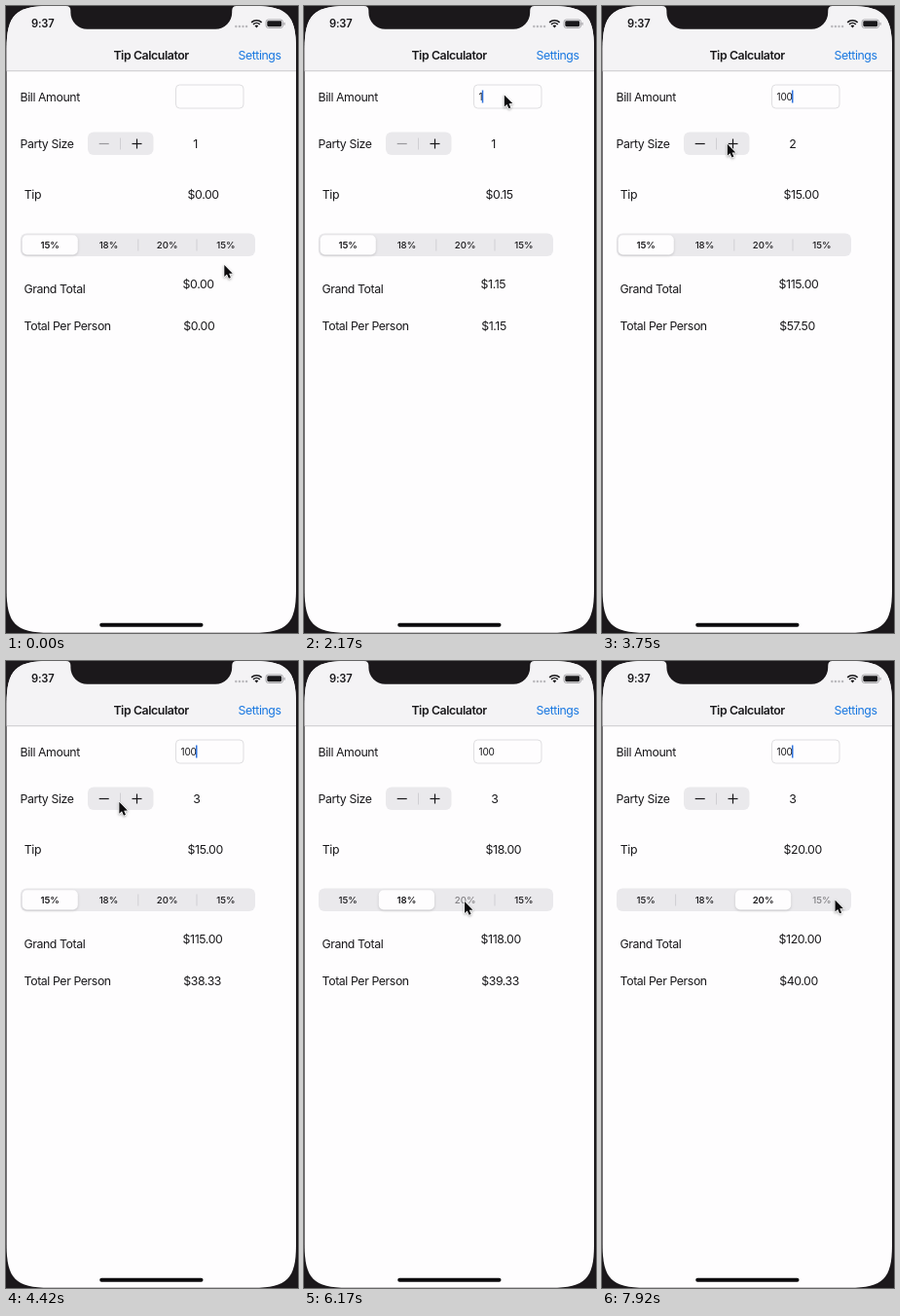
Write an HTML page with a canvas that moves like this. It is 300x644 px and loops after 8 s.

```html
<!DOCTYPE html>
<html lang="en">
<head>
<meta charset="utf-8">
<title>Tip Calculator</title>
<style>
  html, body { margin: 0; width: 100%; height: 100%; overflow: hidden; background: #1b181b; }
  canvas { display: block; width: 300px; height: 644px; }
</style>
</head>
<body>
<canvas id="stage"></canvas>
<script>
const W = 300, H = 644, LOOP = 8000, TICK = 1000 / 12;
const INK = '#19181b', BLUE = '#1877e0', BEZEL = '#1b181b';
const TRACK = '#eae9ec', LINE = '#d0cfd3', PRESSED = '#d5d4d8', PAPER = '#fefdfe';
const RATES = [15, 18, 20, 15], SEG_W = 60.2;

const canvas = document.getElementById('stage');
const ctx = canvas.getContext('2d');
const dpr = window.devicePixelRatio || 1;
canvas.width = W * dpr;
canvas.height = H * dpr;

// Pointer moves: start, end, x, y
const MOVES = [
  [83, 250, 200, 92], [417, 833, 205.8, 91.4], [2833, 3083, 128.8, 141.7],
  [4167, 4667, 104, 148], [5000, 5167, 130, 142], [5250, 5500, 107, 247],
  [5917, 6083, 165, 247], [6500, 6667, 135, 247], [6833, 7167, 45, 247],
  [7250, 7667, 239.5, 245.5]
];

// Taps: step taps count on press, segment taps select on release
const TAPS = [
  { down: 3333, up: 3750, step: 1 }, { down: 3917, up: 4167, step: 1 },
  { down: 4750, up: 4917, step: -1 }, { down: 5167, up: 5333, step: 1 },
  { down: 5750, up: 5833, seg: 1 }, { down: 6167, up: 6250, seg: 2 },
  { down: 7917, up: 8100, seg: 3 }
];

const clamp = v => Math.min(Math.max(v, 0), 1);
const mix = (a, b, p) => a + (b - a) * p;
const smooth = p => p * p * (3 - 2 * p);
const easeOut = p => 1 - (1 - p) ** 2;

function pointerAt(t) {
  let x = 224.3, y = 266;
  for (const [from, to, nx, ny] of MOVES) {
    const p = smooth(clamp((t - from) / (to - from)));
    x = mix(x, nx, p);
    y = mix(y, ny, p);
  }
  return [x, y];
}

// The blink restarts when the field gets focus and after the last digit
function caretAlpha(t) {
  if (t < 1000) return 0;
  if (t >= 2000 && t < 2417) return 1;
  const phase = (t < 2000 ? t - 1000 : t - 2417) % 1000;
  return clamp((720 - phase) / 180);
}

function stateAt(t) {
  const digits = clamp((t - 1750) / 750) * 3;
  const s = { bill: '100'.slice(0, Math.floor(digits)), party: 1, seg: 0, thumb: 0, step: 0, held: -1 };
  for (const tap of TAPS) {
    const isHeld = t >= tap.down && t < tap.up;
    if (tap.step) {
      if (t >= tap.down) s.party += tap.step;
      if (isHeld) s.step = tap.step;
    } else {
      if (t >= tap.up) s.seg = tap.seg;
      if (isHeld) s.held = tap.seg;
      s.thumb = mix(s.thumb, tap.seg, easeOut(clamp((t - tap.up) / 250)));
    }
  }
  return s;
}

function box(x, y, w, h, r, fill, stroke) {
  ctx.beginPath();
  ctx.roundRect(x, y, w, h, r);
  if (fill) { ctx.fillStyle = fill; ctx.fill(); }
  if (stroke) { ctx.strokeStyle = stroke; ctx.lineWidth = 1; ctx.stroke(); }
}

function rect(x, y, w, h, fill) {
  ctx.fillStyle = fill;
  ctx.fillRect(x, y, w, h);
}

function text(str, x, y, { size = 12.3, weight = 400, color = INK, align = 'left', space = -0.4 } = {}) {
  ctx.font = `${weight} ${size}px Inter, "Liberation Sans", sans-serif`;
  ctx.letterSpacing = space + 'px';
  ctx.textAlign = align;
  ctx.fillStyle = color;
  ctx.fillText(str, x, y);
}

// Screen outline with soft continuous corners
function screenPath(l, t, r, b) {
  const reach = 44, pull = 9.3;
  ctx.beginPath();
  for (const [x, y, sx, sy] of [[l, t, 1, 1], [r, t, -1, 1], [r, b, -1, -1], [l, b, 1, -1]]) {
    const along = [d => [x + sx * d, y], d => [x, y + sy * d]];
    const [into, out] = sx === sy ? along.reverse() : along;
    ctx.lineTo(...into(reach));
    ctx.bezierCurveTo(...into(pull), ...out(pull), ...out(reach));
  }
  ctx.closePath();
}

function drawNotch() {
  const l = 66.4, r = 232.2, b = 23.8;
  ctx.beginPath();
  ctx.moveTo(l - 4.5, 0);
  ctx.quadraticCurveTo(l, 0, l, 5);
  ctx.arcTo(l, b, l + 17, b, 17);
  ctx.arcTo(r, b, r, 5, 17);
  ctx.lineTo(r, 5);
  ctx.quadraticCurveTo(r, 0, r + 4.5, 0);
  ctx.fillStyle = BEZEL;
  ctx.fill();
}

function drawStatus() {
  text('9:37', 26, 22, { size: 11.2, weight: 600, space: -0.2 });
  ctx.fillStyle = '#b9b8bc';
  for (let i = 0; i < 4; i++) {
    ctx.beginPath();
    ctx.arc(236.3 + i * 3.6, 21, 1.2, 0, 7);
    ctx.fill();
  }
  const up = -Math.PI / 2, spread = 0.76;
  ctx.strokeStyle = ctx.fillStyle = INK;
  ctx.lineWidth = 1.6;
  for (const r of [7.6, 4.9]) {
    ctx.beginPath();
    ctx.arc(257.4, 22.4, r, up - spread, up + spread);
    ctx.stroke();
  }
  ctx.beginPath();
  ctx.moveTo(257.4, 22.4);
  ctx.arc(257.4, 22.4, 2.8, up - spread, up + spread);
  ctx.fill();
  box(267, 14, 17.5, 8.5, 2.5, null, '#a5a4a8');
  box(268.3, 15.3, 14.9, 5.9, 1.4, INK);
  box(285.5, 16.8, 1.2, 3, 0.6, '#a5a4a8');
}

function drawStepper({ party, step }) {
  box(84, 129.5, 67.5, 23.5, 6, TRACK);
  if (step > 0) box(118, 129.5, 33.5, 23.5, [0, 6, 6, 0], PRESSED);
  if (step < 0) box(84, 129.5, 33.5, 23.5, [6, 0, 0, 6], PRESSED);
  rect(117, 135.5, 1, 12, LINE);
  rect(95.7, 140.9, 10, 1.2, party > 1 ? INK : '#99989c');
  rect(129.5, 140.9, 10, 1.2, INK);
  rect(133.9, 136.5, 1.2, 10, INK);
}

function drawSegments({ seg, thumb, held }) {
  box(15, 233.5, 241, 23.5, 6, TRACK);
  for (let i = 1; i < 4; i++) {
    if (i !== seg && i !== seg + 1) rect(14.9 + i * SEG_W, 239.5, 1, 12, LINE);
  }
  ctx.save();
  ctx.shadowColor = 'rgba(0,0,0,.16)';
  ctx.shadowBlur = 3 * dpr;
  ctx.shadowOffsetY = dpr;
  box(16.6 + thumb * SEG_W, 235.2, 57.2, 20.2, 5, PAPER);
  ctx.restore();
  RATES.forEach((rate, i) => {
    ctx.globalAlpha = i === held ? 0.5 : 1;
    text(rate + '%', 45.2 + i * SEG_W, 248.6, {
      size: 9.6, weight: i === seg ? 600 : 500, align: 'center', space: 0
    });
  });
  ctx.globalAlpha = 1;
}

function drawField(bill, alpha) {
  box(174.5, 81, 69.5, 24, 4, PAPER, '#dfdee1');
  text(bill, 179.6, 97, { size: 10, space: -0.2 });
  ctx.globalAlpha = alpha;
  rect(179.4 + Math.max(ctx.measureText(bill).width - 0.5, 0), 86.5, 1.5, 13, '#2f72dd');
  ctx.globalAlpha = 1;
}

function drawPointer(x, y) {
  const pts = [[0, 0], [0, 12], [2.7, 9.5], [4.6, 13.8], [6.6, 13], [4.8, 8.8], [8.5, 8.7]];
  ctx.save();
  ctx.translate(x, y);
  ctx.beginPath();
  pts.forEach(p => ctx.lineTo(...p));
  ctx.closePath();
  ctx.lineJoin = 'round';
  ctx.lineWidth = 1.5;
  ctx.strokeStyle = '#fff';
  ctx.shadowColor = 'rgba(0,0,0,.35)';
  ctx.shadowBlur = 2.5 * dpr;
  ctx.shadowOffsetY = dpr;
  ctx.stroke();
  ctx.shadowColor = 'transparent';
  ctx.fillStyle = '#0c0b0d';
  ctx.fill();
  ctx.restore();
}

function draw(t) {
  const state = stateAt(t);
  const bill = Number(state.bill);
  const tip = bill * RATES[state.seg] / 100;
  const total = bill + tip;
  const money = n => '$' + n.toFixed(2);

  ctx.setTransform(dpr, 0, 0, dpr, 0, 0);
  rect(0, 0, W, H, BEZEL);
  ctx.save();
  screenPath(0.6, 0, 298, 643.7);
  ctx.clip();
  rect(0, 0, W, H, PAPER);
  rect(0, 0, W, 66.5, '#f4f3f5');
  rect(0, 66.3, W, 0.9, '#c5c4c8');
  ctx.restore();
  drawNotch();
  drawStatus();

  text('Tip Calculator', 149.1, 55, { weight: 600, align: 'center' });
  text('Settings', 238.4, 55, { color: BLUE });
  text('Bill Amount', 14.6, 98);
  text('Party Size', 14.6, 146);
  text('Tip', 18.8, 198);
  text('Grand Total', 18.4, 295.4);
  text('Total Per Person', 18.6, 333.4);
  text(String(state.party), 192.2, 146);
  text(money(tip), 186.6, 198);
  text(money(total), 181.6, 290.4);
  text(money(total / state.party), 182.2, 333.4);

  drawField(state.bill, caretAlpha(t));
  drawStepper(state);
  drawSegments(state);
  box(96.2, 633.7, 106.3, 4, 2, '#0b0a0c');
  drawPointer(...pointerAt(t));
}

const start = performance.now();
function loop() {
  const ms = (performance.now() - start) % LOOP;
  // The picture steps twelve times a second; +1 keeps steps clear of rounding.
  draw((Math.floor((ms + 4) / TICK) * TICK + 1) % LOOP);
  requestAnimationFrame(loop);
}
loop();
</script>
</body>
</html>
```
